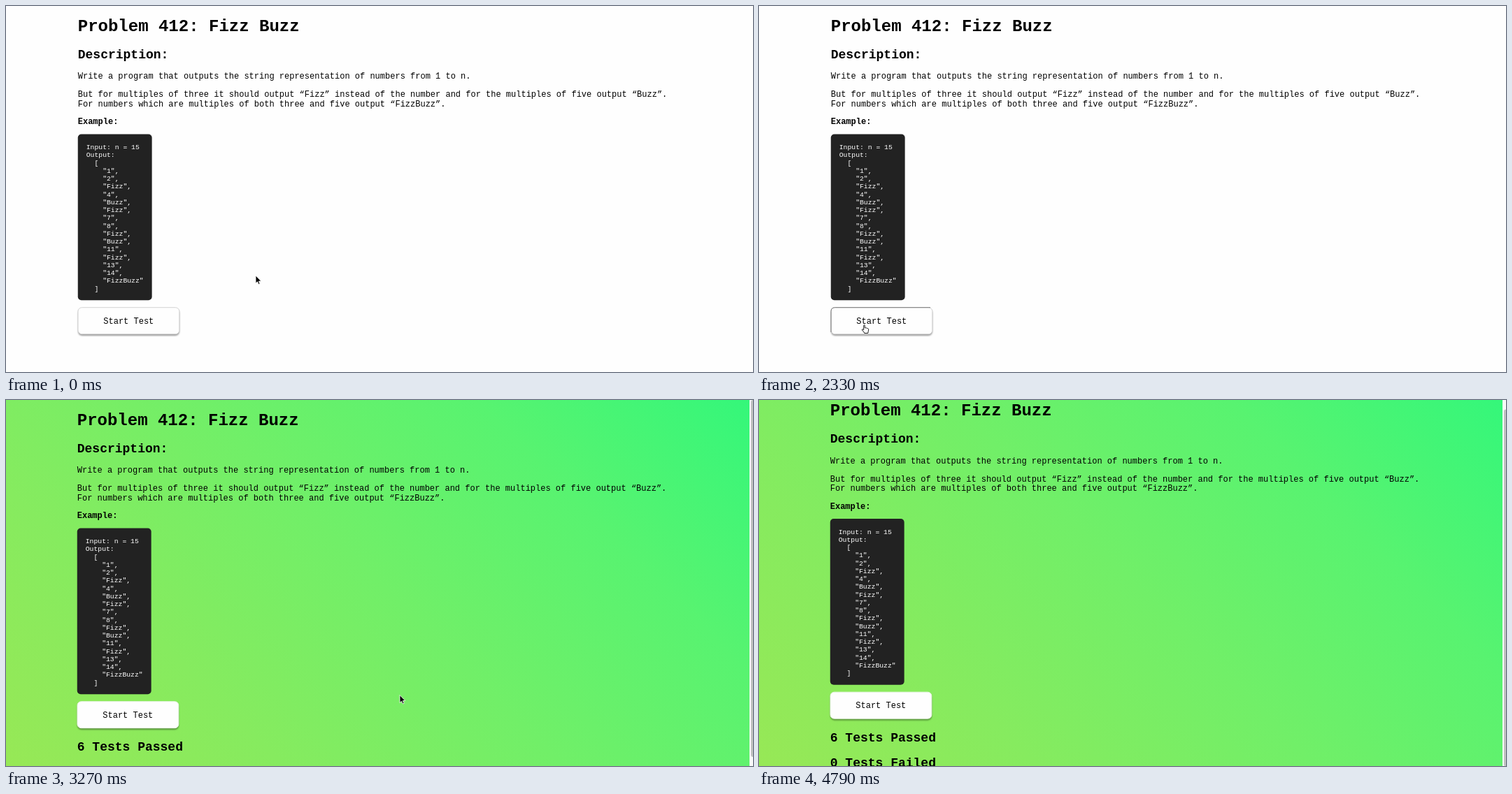
An HTML page for the animation above (5250 ms loop, 1068 by 524 pixels).

```html
<!DOCTYPE html>
<html lang="en">
<head>
<meta charset="utf-8">
<title>Fizz Buzz</title>
<style>
  html, body { margin: 0; width: 100%; height: 100%; overflow: hidden; background: #fefefe; }
  svg { display: block; width: 100vw; height: 100vh; }
  text { font-family: "Liberation Mono", "Courier New", Courier, monospace; font-size: 12px; fill: #000; }
  .h1 { font-size: 24px; font-weight: 700; }
  .h2 { font-size: 18px; font-weight: 700; }
  .strong { font-weight: 700; }
  .code { font-size: 9.75px; fill: #fff; }
</style>
</head>
<body>
<svg id="stage" viewBox="0 0 1068 524" xmlns="http://www.w3.org/2000/svg">
  <defs>
    <linearGradient id="green" gradientUnits="userSpaceOnUse" x1="136" y1="660" x2="932" y2="-136">
      <stop offset="0" stop-color="#97e856"/>
      <stop offset=".25" stop-color="#86eb5f"/>
      <stop offset=".5" stop-color="#71ef68"/>
      <stop offset=".75" stop-color="#58f370"/>
      <stop offset="1" stop-color="#34f77a"/>
    </linearGradient>
    <filter id="soft" x="-10%" y="-30%" width="120%" height="160%">
      <feGaussianBlur stdDeviation="1"/>
    </filter>
  </defs>
  <rect width="1068" height="524" fill="#fefefe"/>
  <rect id="passed" width="1068" height="524" fill="url(#green)"/>
  <g id="page">
    <rect x="102.75" y="183.6" width="105.9" height="237.6" rx="5" fill="#222"/>
    <rect x="103" y="433.6" width="145" height="38.4" rx="6" opacity=".4" filter="url(#soft)"/>
    <rect id="button" x="103" y="431.7" width="144.8" height="38" rx="5.5" fill="#fefefe" stroke="#d4d4d4"/>
    <path id="pressed" d="M103 467V437.2Q103 431.7 108.5 431.7H245" fill="none" stroke="#777"/>
  </g>
  <g id="scrollbar">
    <rect x="1063" width="5" height="524" fill="#fafafa"/>
    <rect id="thumb" x="1065" width="6" height="511" rx="3" fill="#c1c1c1"/>
  </g>
  <path id="arrow" d="M0 0V11L2.5 8.7 4.2 12.5 6 11.8 4.4 8H7.8Z" stroke="#fff" stroke-width=".8"/>
  <path id="hand" d="M3.2 7.6V1.6Q3.2 .6 4 .6T4.8 1.6V4.8Q5.6 4.2 6.3 5Q7.2 4.5 7.8 5.4Q8.8 5 9.4 6Q10.3 6 10.2 7.2L9.8 9.5 9.2 12.4H4.2L3.6 11 1 8Q.4 7 1.4 6.8Q2.4 6.8 3.2 7.6Z"
    fill="#fff" stroke="#000" stroke-width=".9" stroke-linejoin="round"/>
</svg>
<script>
const LOOP = 5250;
const LEFT = 102.75;
const el = id => document.getElementById(id);
const page = el("page");

function addText(str, x, y, cls = "") {
  const node = document.createElementNS("http://www.w3.org/2000/svg", "text");
  node.setAttribute("x", x);
  node.setAttribute("y", y);
  node.setAttribute("class", cls);
  node.textContent = str;
  return page.appendChild(node);
}

addText("Problem 412: Fizz Buzz", LEFT, 35.5, "h1");
addText("Description:", LEFT, 74.5, "h2");
addText("Write a program that outputs the string representation of numbers from 1 to n.", LEFT, 104.3);
addText("But for multiples of three it should output “Fizz” instead of the number and for the multiples of five output “Buzz”.", LEFT, 130);
addText("For numbers which are multiples of both three and five output “FizzBuzz”.", LEFT, 143.6);
addText("Example:", LEFT, 169, "strong");
addText("Start Test", 139.3, 454.6);
const score = addText("", LEFT, 502, "h2");
const failed = addText("0 Tests Failed", LEFT, 538, "h2");

// Sample code block: [indent, text]
const fizz = n => (n % 3 ? "" : "Fizz") + (n % 5 ? "" : "Buzz") || n;
const lines = [[0, "Input: n = 15"], [0, "Output:"], [2, "["]];
for (let n = 1; n <= 15; n++) lines.push([4, `"${fizz(n)}"${n < 15 ? "," : ""}`]);
lines.push([2, "]"]);
lines.forEach(([indent, str], i) =>
  addText(str, LEFT + 12 + indent * 5.85, 205 + i * 11.25, "code"));

// Pointer stops: [start ms, x, y, shape]
const stops = [
  [0, 357, 386, "arrow"], [180, 355.3, 386, "arrow"],
  [320, 350, 388, "arrow"], [430, 325, 397, "arrow"], [540, 274, 418, "arrow"],
  [650, 214, 437, "hand"], [770, 185.5, 443, "hand"],
  [890, 173, 447, "hand"], [1010, 155, 453, "hand"], [1130, 142.5, 456, "hand"], [1250, 146.5, 456, "hand"],
  [2980, 152, 454, "hand"], [3080, 300, 441, "arrow"], [3180, 480, 428, "arrow"], [3270, 563, 422.5, "arrow"],
  [4140, 580, 425, "arrow"], [4250, 680, 441, "arrow"], [4360, 820, 465, "arrow"],
  [4470, 950, 486, "arrow"], [4580, 1036.5, 499.5, "arrow"], [4700, 1040.5, 511, "arrow"],
  [4790, 0, 0, "none"]
];
const tests = [[2450, 2], [2570, 4], [2710, 6]];

const current = (list, t) => list.reduce((found, item) => item[0] <= t ? item : found, list[0]);
const show = (node, on) => node.setAttribute("visibility", on ? "visible" : "hidden");

function draw(t) {
  const done = t >= 2450;
  const scroll = t >= 3570 ? 13.5 : 0;
  page.setAttribute("transform", `translate(${done ? -1 : 0} ${-scroll})`);
  [el("passed"), el("scrollbar"), score, failed].forEach(node => show(node, done));
  show(el("pressed"), t >= 2330 && !done);
  el("button").setAttribute("stroke", done ? "#eaf5e6" : "#d4d4d4");
  el("thumb").setAttribute("y", scroll);
  score.textContent = `${current(tests, t)[1]} Tests Passed`;

  const [, x, y, shape] = current(stops, t);
  for (const id of ["arrow", "hand"]) {
    show(el(id), id === shape);
    el(id).setAttribute("transform", `translate(${x} ${y})`);
  }
}

const start = performance.now();
function tick() {
  draw((performance.now() - start) % LOOP);
  requestAnimationFrame(tick);
}
tick();
</script>
</body>
</html>
```
